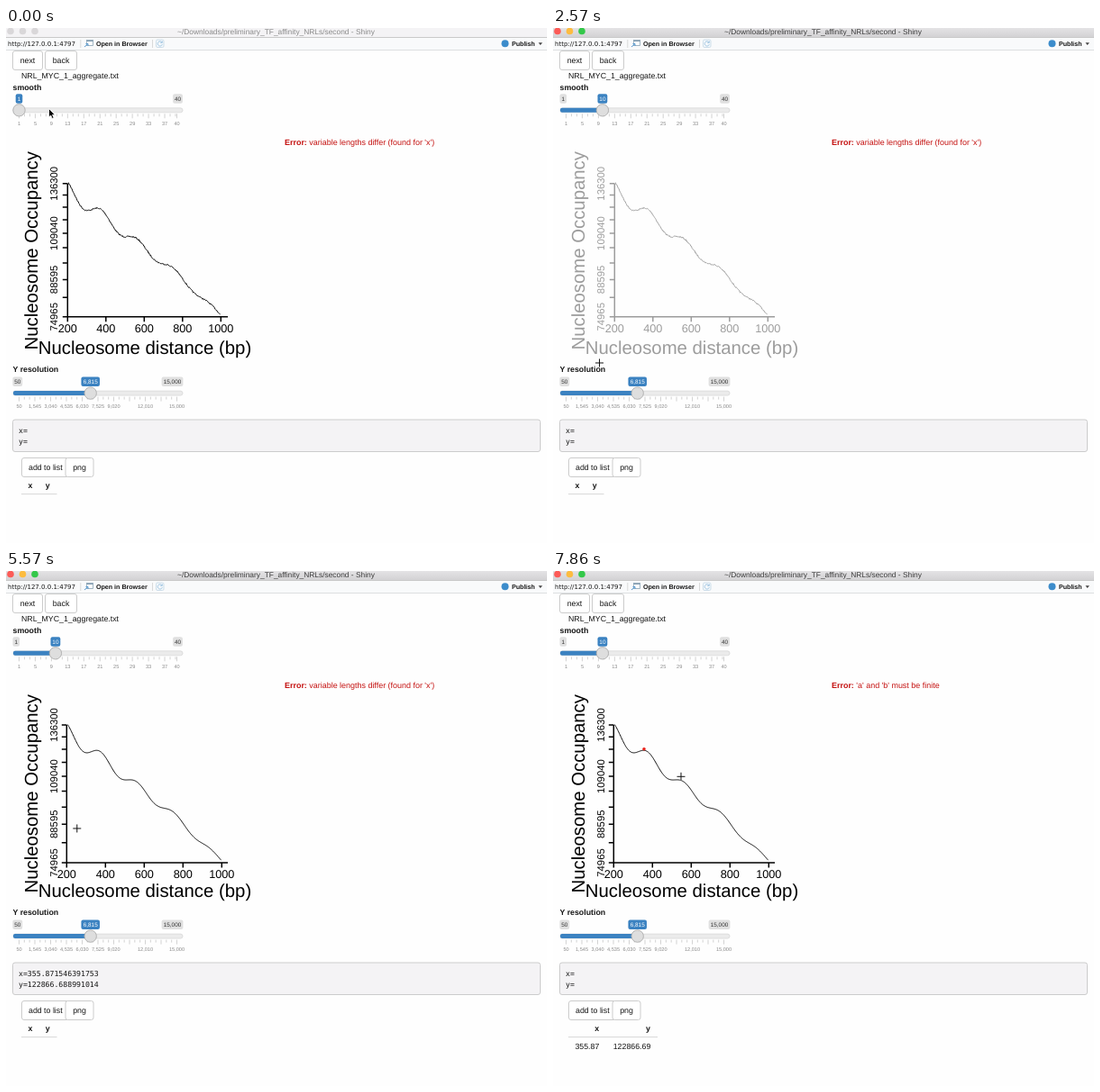
Animation, 600 px wide and 572 px high, one loop 8 s. Source, as an HTML page:

```html
<!DOCTYPE html>
<html lang="en">
<head>
<meta charset="utf-8">
<title>Nucleosome occupancy</title>
<style>
  html, body { margin: 0; width: 100%; height: 100%; overflow: hidden; background: #fefefe; }
  svg { display: block; width: 600px; height: 572px; }
  text { font-family: "Liberation Sans", Arial, sans-serif; font-size: 8.8px; fill: #151515; text-rendering: geometricPrecision; white-space: pre; }
  .bold { font-weight: 700; }
  .mid { text-anchor: middle; }
  .end { text-anchor: end; }
  .mono { font-family: "DejaVu Sans Mono", monospace; font-size: 8.2px; }
  .url { font-family: "DejaVu Sans", sans-serif; font-size: 7px; }
  .tool { font-size: 7.1px; }
  .tag { font-size: 6.4px; fill: #333; }
  .grid { font-size: 5.6px; fill: #888; }
  .error, .error tspan { font-size: 8.95px; fill: #c4100f; }
  .plot text { fill: #000; }
  .value { font-size: 11.3px; }
  .distance { font-size: 12.7px; }
  .label { font-size: 20.35px; }
</style>
</head>
<body>
<svg id="stage" viewBox="0 0 600 572"></svg>
<script>
const LOOP = 8000, STEP = 1000 / 7;
const BLUE = '#3b82c1';

const text = (x, y, s, cls = '', extra = '') => `<text x="${x}" y="${y}" class="${cls}" ${extra}>${s}</text>`;
const box = (x, y, w, h, fill, extra = '') => `<rect x="${x}" y="${y}" width="${w}" height="${h}" fill="${fill}" ${extra}/>`;
const path = (d, stroke = '#000', width = 1) => `<path d="${d}" fill="none" stroke="${stroke}" stroke-width="${width}"/>`;
const circle = (x, y, r, fill, extra = '') => `<circle cx="${x}" cy="${y}" r="${r}" fill="${fill}" ${extra}/>`;
const group = (id, body, cls = '') => `<g id="${id}" class="${cls}">${body}</g>`;
const turned = (x, y, s, cls) => text(0, 0, s, 'mid ' + cls, `transform="translate(${x} ${y}) rotate(-90)"`);
const commas = n => n.toLocaleString('en-US');
const clamp = u => Math.max(0, Math.min(1, u));

const button = (x, y, w, label) =>
  box(x, y, w, 21, '#fff', 'rx="2.5" stroke="#ccc"') + text(x + w / 2, y + 13.6, label, 'mid');

function tag(x, y, n, fill = '#e0e0e0', color = '#333') {
  const label = commas(n), w = 4.3 + 3.25 * label.length;
  return box(x - w / 2, y - 18, w, 10.4, fill, 'rx="2"') + text(x, y - 10.5, label, 'mid tag', `style="fill:${color}"`);
}

// Range slider; `y` is the centre of its track, marks sit `step` apart with two small ticks between
function slider({ id, y, min, max, step }) {
  const at = v => 14.5 + (v - min) / (max - min) * 175;
  let s = box(8, y - 2.5, 188, 5, '#ebebeb', 'rx="2.5" stroke="#d4d4d4" stroke-width=".7"');
  for (let i = 0; i <= 30; i++) {
    const v = Math.min(max, min + step * i / 3), major = i % 3 === 0;
    s += path(`M${at(v)} ${y + 4}v${major ? 5 : 3}`, '#b5b5b5', .6);
    if (major && (v < 10000 || i % 2 === 0)) s += text(at(v), y + 16.2, commas(v), 'mid grid');
  }
  s += group(id + 'Min', tag(min > 9 ? 12.8 : 11.3, y, min));
  return s + tag(max > 99 ? 184.5 : 190.5, y, max) + `<g id="${id}"></g>`;
}

function sliderValue({ y, min, max }, v) {
  const x = 14.5 + (v - min) / (max - min) * 175;
  return box(8, y - 2.5, x - 8, 5, BLUE, 'rx="2"') +
    circle(x, y, 6.7, '#dedede', 'stroke="#adadad" stroke-width=".9"') + tag(x, y, v, BLUE, '#fff');
}

const SMOOTH = { id: 'smooth', y: 91.3, min: 1, max: 40, step: 4 };
const RESOLUTION = { id: 'res', y: 405.6, min: 50, max: 15000, step: 1495 };

let seed = 7;
const random = () => (seed = seed * 16807 % 2147483647) / 2147483647;

// Falling trend with a late drop and a damped wave of one nucleosome repeat (188 bp); 0 is the top of the axis, 1 the bottom
function occupancy(bp) {
  const drop = .056 / (1 + Math.exp((855 - bp) / 32));
  const wave = .062 * Math.exp((200 - bp) / 550) * Math.cos(2 * Math.PI * (bp - 285) / 188);
  return .0464 + .0011 * (bp - 200) + drop + wave;
}

// The y axis is logarithmic, with ticks every 6815
function plot({ left, gap, top, bottom, noise }) {
  const high = 136300, low = 74965, step = 6815;
  const yOf = v => top + (bottom - top) * Math.log(high / v) / Math.log(high / low);
  let axes = `M${left} ${top}V${bottom}H246`, labels = '';
  for (let v = low; v <= high; v += step) axes += `M${left - 5.5} ${yOf(v)}H${left}`;
  for (const n of [0, 2, 5, 9]) labels += turned(57.3, yOf(low + n * step), low + n * step, 'value');
  for (let bp = 200; bp <= 1000; bp += 200) {
    const x = left + gap * (bp / 200 - 1);
    axes += `M${x} ${bottom}v5.5`;
    labels += text(x, bottom + 17, bp, 'mid distance');
  }
  const points = [];
  for (let bp = 205; bp <= 998; bp += 3) {
    const y = top + (bottom - top) * occupancy(bp) + (random() - .5) * noise;
    points.push(`${(left + gap * (bp / 200 - 1)).toFixed(2)} ${y.toFixed(2)}`);
  }
  return path(axes, '#000', 1.5) + labels + path('M' + points.join('L'), '#000', .95) +
    turned(34.5, 247.3, 'Nucleosome Occupancy', 'label') + text(154, 361.7, 'Nucleosome distance (bp)', 'mid label');
}

const table = (x, y, end, row = '') =>
  text(x, 511.3, 'x', 'bold mid') + text(y, 511.3, 'y', 'bold mid') + box(17, 517, end - 17, 1.2, '#ddd') + row;

const error = msg => text(309, 130, `<tspan class="bold">Error:</tspan> ${msg}`, 'error');

const lights = colors => colors.map((c, i) => circle(5 + 13.5 * i, 3.5, 3.8, c)).join('');

const arrow = '<path d="M0 0V9.5L2.2 7.6L3.8 11L5.5 10.2L4 6.9H6.8Z" fill="#000" stroke="#fff" stroke-width=".8"/>';
const plus = 'M-4.5 0H4.5M0 -4.5V4.5';
const cross = path(plus, '#ffffff99', 2.4) + path(plus, '#111', 1);
const hand = '<path d="M-2.2 -4.2Q-1.2 -5.4 -.3 -4.2L.6 -1.5Q3.8 -2.4 5.5 .8L5 3.4L3.8 6H-.6L-3.8 2.3Q-4.3 .7 -2.6 1.2L-1.2 2.1Z" ' +
  'fill="#fff" stroke="#111" stroke-width=".9"/>';

const toolbar =
  box(0, 11, 600, 13, '#f9fafb') + box(0, 24, 600, 1, '#dcdfe1') +
  text(2, 20, 'http://127.0.0.1:4797', 'url') +
  box(82.5, 13, .7, 9, '#ccc') + box(162, 13, .7, 9, '#ccc') +
  box(89.5, 13.5, 7, 6, '#fff', 'stroke="#8ba3b5" stroke-width=".8"') + box(89.5, 13.5, 7, 1.6, '#8ba3b5') +
  path('M87 21l4-3.5m-2.5 0h2.5v2.5', '#5b9bd0') +
  text(100, 20, 'Open in Browser', 'bold tool') +
  box(166.5, 13, 8.5, 8.5, '#f4f8fb', 'rx="1.5" stroke="#c3d7e6" stroke-width=".8"') +
  path('M173 16a2.6 2.6 0 1 0 .3 2.2M173.3 14.4v2h-2', '#9cc3e0', .9) +
  circle(553.5, 17.3, 4, '#3c8ccb') +
  text(561, 20, 'Publish', 'bold tool') + '<path d="M590.5 16.3h4.4l-2.2 2.8z" fill="#444"/>';

const stage = document.getElementById('stage');
stage.innerHTML =
  `<defs><linearGradient id="bar" x2="0" y2="1"><stop stop-color="#e4e3e5"/><stop offset="1" stop-color="#d3d2d4"/></linearGradient></defs>` +
  box(0, 0, 600, 572, '#fefefe') +
  box(0, 0, 600, 10, '#f4f3f5') + lights(Array(3).fill('#d9d7d9')) +
  group('active', box(0, 0, 600, 10, 'url(#bar)') + lights(['#fc5b57', '#fdbc40', '#34c84a'])) +
  box(0, 10, 600, 1, '#c9c9c9') +
  text(299.5, 6.8, '~/Downloads/preliminary_TF_affinity_NRLs/second - Shiny', 'mid', 'id="title" style="font-size:8.38px"') +
  toolbar +
  button(7.5, 25.5, 33, 'next') + button(43.5, 25.5, 35, 'back') +
  text(17, 55.7, 'NRL_MYC_1_aggregate.txt') + text(7.5, 68.6, 'smooth', 'bold') + slider(SMOOTH) +
  group('error1', error("variable lengths differ (found for 'x')")) +
  group('error2', error("'a' and 'b' must be finite")) +
  group('rough', plot({ left: 68.3, gap: 42.5, top: 172.8, bottom: 320.8, noise: 1.6 }), 'plot') +
  group('fine', plot({ left: 67.3, gap: 43, top: 171, bottom: 324, noise: 0 }) +
    group('dot', circle(101, 197.8, 1.8, '#e8231c')), 'plot') +
  text(7.5, 381.7, 'Y resolution', 'bold') + slider(RESOLUTION) +
  box(7.5, 435, 585, 35.5, '#f4f3f5', 'rx="2.5" stroke="#ccc"') +
  text(14, 450.3, '', 'mono', 'id="outX"') + text(14, 461.5, '', 'mono', 'id="outY"') +
  button(17.5, 477.5, 53, '') + button(66, 477.5, 31, 'png') + text(25, 491.1, 'add to list') +
  group('empty', table(27, 46.3, 56.5)) +
  group('filled', table(48.8, 105.5, 116,
    text(51.3, 530.8, '355.87', 'end') + text(108.3, 530.8, '122866.69', 'end'))) +
  group('arrow', arrow) + group('cross', cross) + group('hand', hand);

const el = Object.fromEntries([...stage.querySelectorAll('[id]')].map(e => [e.id, e]));
el.res.innerHTML = sliderValue(RESOLUTION, 6815);
const show = (id, on) => { el[id].style.display = on ? '' : 'none'; };

// Pointer stops: time, x, y; it eases from one to the next
const STOPS = [[0, 47.5, 89.5], [1000, 52.5, 91.5], [1900, 53.5, 92], [2280, 48, 402], [2570, 51.5, 372],
  [3290, 96, 212], [4860, 99, 192.5], [5400, 101, 197.5], [5860, 30, 480], [6570, 28.5, 482],
  [7140, 128, 229], [7860, 142, 228.3]];

function pointer(t) {
  const next = STOPS.findIndex(s => s[0] > t);
  const i = next < 0 ? STOPS.length - 1 : next;
  const [t0, x0, y0] = STOPS[i - 1], [t1, x1, y1] = STOPS[i];
  const u = clamp((t - t0) / (t1 - t0)), k = u * u * (3 - 2 * u);
  return [x0 + (x1 - x0) * k, y0 + (y1 - y0) * k];
}

// Output being recalculated dims over 250 ms
const fade = (t, start) => 1 - .62 * clamp((t - start) / 250);

function render(now) {
  const t = Math.floor((now % LOOP + 4) / STEP) * STEP;
  const active = t > 420, moved = t > 1280, smoothed = t > 2850, picked = t > 5420, added = t > 7420;

  show('active', active);
  el.title.style.fill = active ? '#3c3c3c' : '#8a8a8a';
  show('smoothMin', moved);
  el.smooth.innerHTML = sliderValue(SMOOTH, moved ? 10 : 1);

  show('rough', !smoothed);
  show('fine', smoothed);
  show('dot', added);
  el.rough.style.opacity = fade(t, 1950);
  for (const id of ['fine', 'error1', 'empty']) el[id].style.opacity = added ? 1 : fade(t, 7070);
  for (const id of ['error1', 'empty']) show(id, !added);
  for (const id of ['error2', 'filled']) show(id, added);

  const values = picked && !added;
  el.outX.textContent = values ? 'x=355.871546391753' : 'x=';
  el.outY.textContent = values ? 'y=122866.688991014' : 'y=';

  const [x, y] = pointer(t);
  const kind = y > 110 && y < 374 ? 'cross' : y > 476 ? 'hand' : 'arrow';
  for (const id of ['arrow', 'cross', 'hand']) show(id, id === kind);
  el[kind].setAttribute('transform', `translate(${x} ${y})`);
}

const start = performance.now();
function tick() {
  render(performance.now() - start);
  requestAnimationFrame(tick);
}
tick();
</script>
</body>
</html>
```
